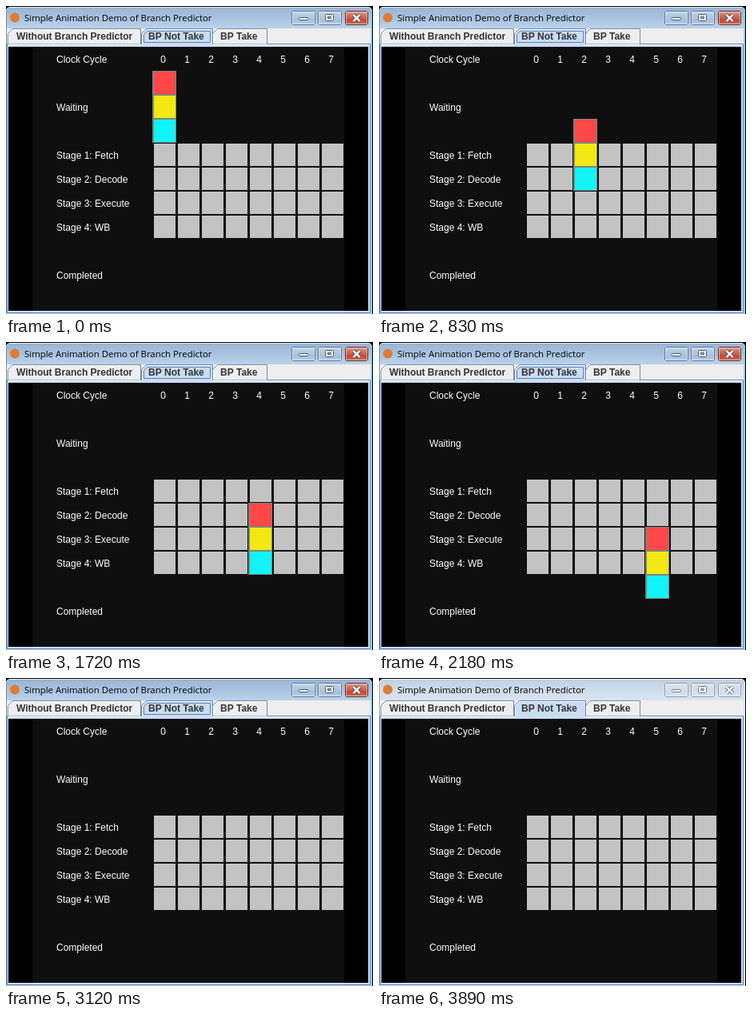
Animation, 459 px wide and 385 px high, one loop 3.99 s. Source, as an HTML page with a canvas:

```html
<!DOCTYPE html>
<html lang="en">
<head>
<meta charset="utf-8">
<title>Branch Predictor</title>
<style>
  html, body { margin: 0; width: 459px; height: 385px; overflow: hidden; background: #000; }
  canvas { display: block; }
</style>
</head>
<body>
<canvas id="stage" width="459" height="385"></canvas>
<script>
const ctx = document.getElementById('stage').getContext('2d');
const LOOP = 3990, BLUR_AT = 3890, STEP = 30;
const GRID_X = 183, GRID_Y = 171;
const SANS = '"Liberation Sans", Arial, sans-serif';
const TILES = ['#ff4848', '#f2e912', '#10f4f7'];

// Visible interval of the stack in each clock cycle
const CYCLES = [
  [0, 120], [280, 680], [830, 1110], [1260, 1720],
  [1720, 2180], [2180, 2710], [2710, 3120], [3270, 3580]
];
const LABELS = [
  ['Clock Cycle', 71], ['Waiting', 131], ['Stage 1: Fetch', 191],
  ['Stage 2: Decode', 221], ['Stage 3: Execute', 251],
  ['Stage 4: WB', 281], ['Completed', 341]
];

function rect(x, y, w, h, fill) {
  ctx.fillStyle = fill;
  ctx.fillRect(x, y, w, h);
}

function text(str, x, y, font, fill, align = 'left') {
  ctx.font = font;
  ctx.fillStyle = fill;
  ctx.textAlign = align;
  ctx.fillText(str, x, y);
}

function line(points, color, width = 1) {
  ctx.beginPath();
  points.forEach(([x, y]) => ctx.lineTo(x, y));
  ctx.strokeStyle = color;
  ctx.lineWidth = width;
  ctx.stroke();
}

function fade(y0, y1, ...colors) {
  const g = ctx.createLinearGradient(0, y0, 0, y1);
  colors.forEach((c, i) => g.addColorStop(i / (colors.length - 1), c));
  return g;
}

function rounded(x, y, w, h, r, fill, stroke) {
  ctx.beginPath();
  ctx.roundRect(x, y, w, h, r);
  ctx.fillStyle = fill;
  ctx.fill();
  if (stroke) {
    ctx.strokeStyle = stroke;
    ctx.lineWidth = 1;
    ctx.stroke();
  }
}

function button(x, w, fill, edge) {
  rounded(x + .5, 6.5, w, 17, 2.5, fill, edge);
  ctx.strokeStyle = 'rgba(255,255,255,.5)';
  ctx.strokeRect(x + 1.5, 7.5, w - 2, 15);
}

function windowFrame(active) {
  rect(0, 0, 459, 385, '#000');
  const frame = active ? '#b9d1ea' : '#d7e4f2';
  rounded(0, 1, 458, 390, [5, 5, 0, 0], frame);
  rounded(1, 2, 456, 26, [4, 4, 0, 0],
    active ? fade(2, 28, '#9ab5d4', '#a9c3df', '#bbd2ea') : fade(2, 28, '#c3d0df', '#cfdcea', '#d8e4f1'));
  line([[4, 1.5], [454, 1.5]], active ? '#e4eef8' : '#eef3f9');
  rect(0, 6, 1, 379, active ? '#6f8aa8' : '#9aa8b6');
  rect(457, 6, 1, 379, active ? '#6fd0ee' : '#e6eef6');

  ctx.beginPath();
  ctx.arc(11, 14.5, 6, 0, Math.PI * 2);
  ctx.fillStyle = '#e07b35';
  ctx.fill();
  text('Simple Animation Demo of Branch Predictor', 23, 19, '11.4px "Open Sans", sans-serif', '#000');
  windowButtons(active);
}

function windowButtons(active) {
  const edge = active ? '#5f7690' : '#8d9aaa';
  const face = active
    ? fade(6, 24, '#c8daed', '#b4cae2', '#a5bfdb', '#bdd3ea')
    : fade(6, 24, '#dce6f1', '#d0dce9', '#d6e2ef');
  button(357, 29, face, edge);
  button(390, 29, face, edge);
  button(424, 28, active ? fade(6, 24, '#e2a797', '#d4725d', '#c14a30', '#d4795b') : face,
    active ? '#5c2a28' : edge);

  const dark = active ? '#4c5662' : '#717b87';
  rounded(366.5, 14.5, 11, 3, 1, '#fff', dark);
  rounded(399.5, 10.5, 10, 8, 1, '#fff', dark);
  rounded(402.5, 13.5, 4, 2, 0, face, dark);
  for (const [color, width] of [[dark, 4.4], ['#fff', 2.4]]) {
    line([[434.5, 11], [442.5, 19]], color, width);
    line([[442.5, 11], [434.5, 19]], color, width);
  }
}

function tab(label, x, right, textX, selected, focused) {
  const edge = selected ? '#6382bf' : '#7a8a99';
  const outline = [[x + .5, 47.5], [x + .5, 34.5], [x + 6.5, 28.5], [right + .5, 28.5], [right + .5, 47.5]];
  ctx.beginPath();
  outline.forEach(([px, py]) => ctx.lineTo(px, py));
  ctx.fillStyle = selected ? '#c8ddf2' : '#eeeeee';
  ctx.fill();
  line(outline, edge);
  line([[x + 1.5, 47], [x + 1.5, 35], [x + 7, 29.5], [right, 29.5]], '#fff');
  if (focused) {
    line([[x + 3.5, 45.5], [x + 3.5, 35.5], [x + 7.5, 31.5], [right - 2.5, 31.5],
      [right - 2.5, 45.5], [x + 3.5, 45.5]], '#6382bf');
  }
  text(label, textX, 42, `bold 12px ${SANS}`, '#333');
}

function tabs(active) {
  rect(1, 28, 455, 20, '#eeeeee');
  rect(1, 47, 455, 337, '#c8ddf2');
  line([[1, 47.5], [455.5, 47.5], [455.5, 383.5], [1.5, 383.5], [1.5, 47.5]], '#6382bf');
  line([[2, 48.5], [455, 48.5]], '#fff');
  tab('Without Branch Predictor', 2, 168, 13, false, false);
  tab('BP Take', 258, 326, 268, false, false);
  tab('BP Not Take', 169, 258, 178, true, active);
  rect(170, 47, 88, 2, '#c8ddf2');
}

function content() {
  rect(3, 51, 450, 330, '#000');
  rect(33, 51, 390, 330, '#0f0f0f');
  const font = `12px ${SANS}`;
  for (const [label, y] of LABELS) text(label, 63, y, font, '#fff');
  for (let col = 0; col < 8; col++) {
    text(col, 196.5 + col * STEP, 71, font, '#fff', 'center');
    for (let row = 0; row < 4; row++) cell(col, GRID_Y + row * STEP, '#c3c3c3');
  }
}

function cell(col, y, fill) {
  rect(GRID_X + col * STEP + 2, y + 1, 27, 28, fill);
}

function stack(time) {
  const col = CYCLES.findIndex(([from, to]) => time >= from && time < to);
  if (col < 0) return;
  TILES.forEach((color, i) => {
    const y = 81 + (col + i) * STEP;
    rect(GRID_X + col * STEP, y, STEP, STEP, '#808080');
    cell(col, y, color);
  });
}

function draw(time) {
  const active = time < BLUR_AT;
  windowFrame(active);
  tabs(active);
  content();
  stack(time);
}

const start = performance.now();
function tick() {
  draw((performance.now() - start) % LOOP);
  requestAnimationFrame(tick);
}
tick();
</script>
</body>
</html>
```
